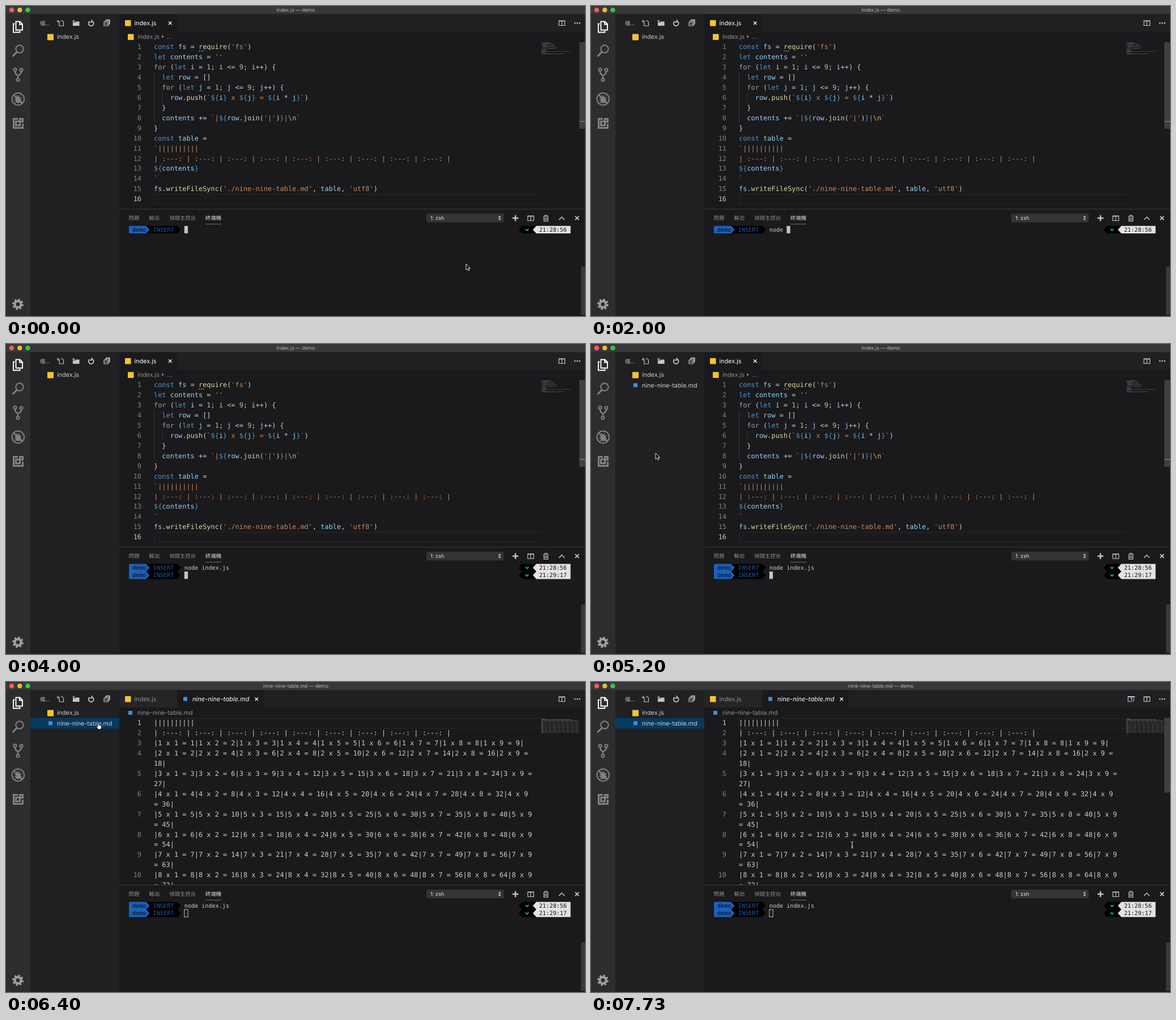
Animation of 1022x548 px, one loop 8000 ms. Source, as an HTML page:

```html
<!DOCTYPE html>
<html lang="zh-Hant">
<head>
<meta charset="utf-8">
<title>Nine-nine table</title>
<style>
  html, body { margin: 0; width: 100%; height: 100%; overflow: hidden; background: #1a191b; }
  svg { display: block; width: 1022px; height: 548px; }
  text { white-space: pre; text-rendering: geometricPrecision; font: 10.8px Inter, "Open Sans", sans-serif; fill: #cccbcd; }
  .title { font-size: 8.7px; text-anchor: middle; fill: #b9b8ba; }
  .code { font: 11.93px "DejaVu Sans Mono", monospace; fill: #cfced0; }
  .num { text-anchor: end; fill: #807f81; }
  .on { fill: #c6c5c7; }
  .term { font: 10.15px "DejaVu Sans Mono", monospace; }
  .cjk { font: 9.4px "Noto Sans CJK TC", "Noto Sans CJK", sans-serif; fill: #8f8e90; }
  .dim { fill: #918f92; }
  .tab { fill: #fff; }
  .italic { font-style: italic; font-size: 11.1px; }
  .line { fill: none; stroke: #c5c4c6; stroke-width: 1.2; }
  .act { fill: none; stroke: #828183; stroke-width: 2; }
</style>
</head>
<body>
<svg viewBox="0 0 1022 548" xmlns="http://www.w3.org/2000/svg">
  <defs><clipPath id="editorClip"><path d="M200 45H1022V358.5H200z"/></clipPath></defs>

  <!-- window areas -->
  <path fill="#1a191b" d="M0 0H1022V548H0z"/>
  <path fill="#383739" d="M0 0H1022V14.5H0z"/>
  <path fill="#2d2c2e" d="M0 14.5H43V548H0z"/>
  <path fill="#201f21" d="M43 14.5H200V548H43zM200 14.5H1022V45H200z"/>
  <circle cx="10" cy="7" r="4.3" fill="#fb5b54"/>
  <circle cx="24.3" cy="7" r="4.3" fill="#e6bd33"/>
  <circle cx="38.5" cy="7" r="4.3" fill="#35c648"/>

  <!-- activity bar -->
  <g class="act">
    <path stroke="#fff" stroke-width="1.9" d="M17.5 27.5h7l4.5 4.5v10.5H17.5zM24 28v4.5h5M15.5 31.5H13v15h11.5V44"/>
    <circle cx="24" cy="76" r="6.7"/><path stroke-width="3" d="M19 81.5L11.5 89"/>
    <circle cx="16" cy="112.5" r="2.6"/><circle cx="27" cy="113" r="2.6"/><circle cx="21" cy="130.5" r="2.6"/>
    <path stroke-width="2.4" d="M16 115.500q0 5 5 7.500v5M27 116q0 4.500-6 7"/>
    <circle cx="21.300" cy="164.500" r="10.800"/><path d="M13.700 157L29 172"/>
    <ellipse cx="21.300" cy="166" rx="3.500" ry="4.700" fill="#828183"/>
    <path stroke-width="1.400" d="M15 162l4 2M27.500 162l-4 2M14.500 167h13.500M15.500 172l4-3M27 172l-4-3M18.500 158l2 3M24 158l-2 3"/>
    <path stroke-width="3" d="M21 199.500H13.500V215.500H29.500V208M17.500 204h7v7h-7zM24.500 199.500h5v5h-5z"/>
    <circle cx="21" cy="527.300" r="5.500" stroke="#a09fa1" stroke-width="4"/>
    <circle cx="21" cy="527.300" r="8.500" stroke="#a09fa1" stroke-width="2.800" stroke-dasharray="3.600 3.076"/>
  </g>

  <!-- explorer -->
  <rect id="hover" x="43" width="157" height="18.500" fill="#272a2c"/>
  <rect id="selected" x="43" y="63.500" width="157" height="18.800" fill="#063a60"/>
  <text class="cjk" x="60" y="33.500" style="fill:#b5b4b6">檔...</text>
  <g class="line">
    <path d="M94 27.500v7.500h7.500v-6.500l-2-2.500h-3"/>
    <path d="M118.500 34.500v-5h4l1-1.500h5.500v6.500z" fill="#c5c4c6"/>
    <path stroke="#6fc27b" stroke-width="1.500" d="M89.500 27h5M92 24.500v5M117 27h5M119.500 24.500v5"/>
    <path stroke-width="1.700" d="M147.500 27a4.500 4.500 0 1 0 4-.700M151.500 24v4.500h-4"/>
    <path d="M173 28.500h7v6.500h-7zM174.500 36M175 28v-1.700h7V33h-2M177 26v-1.700h6V31h-1M174.500 31.800h4"/>
  </g>
  <path fill="#f3c332" d="M73 49.500h11v11H73z"/>
  <text x="90" y="58.300">index.js</text>
  <g id="newFile">
    <path fill="#3f8fd6" d="M75 69.300h7v7h-7z"/>
    <text x="90" y="76.700">nine-nine-table.md</text>
  </g>
  <path id="focus" fill="none" stroke="#0d4566" d="M43.500 45.500H199.500V547.500H43.500z"/>

  <!-- editor -->
  <g id="codeView">
    <text class="title" x="511.500" y="10.200">index.js — demo</text>
    <path fill="#1a191b" d="M200 14.500H302V45H200z"/>
    <path fill="#f3c332" d="M210 25h10.500v10.500H210zM215 49.500h10.500V60H215z"/>
    <text class="tab" x="226.500" y="34.200">index.js</text>
    <path class="line" stroke-width="1.700" style="stroke:#fff" d="M287 27.500l5.500 5.500m0-5.500l-5.500 5.500"/>
    <text class="dim" x="232" y="58.300">index.js</text>
    <path fill="#a3a2a4" d="M275.500 51.500v5l3.200-2.500z"/>
    <text class="dim" x="284" y="58.300">...</text>
    <path fill="none" stroke="#363537" d="M261.500 117.500V206M276 153.500V170.500"/>
    <path fill="none" stroke="#29282a" d="M945 333H261.500V350H945"/>
    <g id="codeLines"></g>
    <path fill="#bbb" d="M340.500 78.700h1.500v1.500h-1.500zm3.500 0h1.500v1.500h-1.500zm3.500 0h1.500v1.500h-1.500z"/>
    <path fill="#3f3e40" d="M1012 64H1022V217H1012z"/>
    <path fill="#777678" d="M1012 203.300H1022V205H1012z"/>
  </g>
  <g id="tableView">
    <text class="title" x="511.500" y="10.200">nine-nine-table.md — demo</text>
    <path fill="#252426" d="M200 14.500H302V45H200z"/>
    <path fill="#1a191b" d="M302 14.500H454V45H302z"/>
    <path fill="#f3c332" d="M210 25h10.500v10.500H210z"/>
    <path fill="#3f8fd6" d="M313 26.500h7v7h-7zM216 51h7v7h-7z"/>
    <text class="dim" x="226.500" y="34.200">index.js</text>
    <text class="tab italic" x="329" y="34.200">nine-nine-table.md</text>
    <path class="line" stroke-width="1.700" style="stroke:#fff" d="M439.500 27.500l5.500 5.500m0-5.500l-5.500 5.500"/>
    <text class="dim" x="232" y="58.300">nine-nine-table.md</text>
    <path fill="none" stroke="#29282a" d="M945 64.500H261.500V81.500H945"/>
    <g id="tableLines" clip-path="url(#editorClip)"></g>
  </g>
  <g id="late">
    <path fill="#3f3e40" d="M1012 63.500H1022V195.500H1012z"/>
    <path class="line" d="M952 34.500h-4v-9h11v3M953.500 25.500v5M948 26.500h11"/>
    <circle class="line" cx="956" cy="31.500" r="2.300" style="stroke:#62a5d8"/>
    <path class="line" style="stroke:#62a5d8" d="M954.500 33.500l-2 2.500"/>
  </g>
  <path class="line" d="M976 26h10.500v8.500H976zM981.200 26v8.500M976 26.700h10.500"/>
  <path fill="#c5c4c6" d="M1003 29h2.300v2.300H1003zm4.200 0h2.300v2.300h-2.300zm4.200 0h2.300v2.300h-2.300z"/>

  <!-- panel -->
  <path fill="#3b3a3c" d="M200 358.500H1022V359.500H200z"/>
  <text class="cjk" x="216.500" y="378.200">問題</text>
  <text class="cjk" x="252.500" y="378.200">輸出</text>
  <text class="cjk" x="288.300" y="378.200">偵錯主控台</text>
  <text class="cjk" x="352" y="378.200" style="fill:#e4e3e5">終端機</text>
  <path fill="#6f6e70" d="M352 385H380V386H352z"/>
  <rect x="742" y="367" width="136.500" height="15.500" rx="2" fill="#343335"/>
  <text x="749" y="378" style="font-size:9.300px;fill:#e2e1e3">1: zsh</text>
  <path fill="#d5d4d6" d="M868.800 373.700h5l-2.500-3zM868.800 375.700h5l-2.500 3z"/>
  <g class="line">
    <path stroke-width="2.400" d="M894 375h10.500M899.200 369.700v10.500"/>
    <path d="M921 371h10.500v8.500H921zM926.200 371v8.500M921 371.700h10.500"/>
    <path d="M949.500 373v7.500h7V373M948 372h10M951 371.500v-1.500h4v1.500M951.700 374v5M954.300 374v5"/>
    <path stroke-width="1.500" d="M976 378l5-5 5 5"/>
    <path stroke-width="1.900" d="M1004.700 371.700l6.500 6.500m0-6.500l-6.500 6.500"/>
  </g>
  <path fill="#39383a" d="M1015 460.500H1022V546H1015z"/>
  <g id="prompt1"></g>
  <g id="prompt2"></g>
  <text id="typed" class="term" x="314.800" y="399"></text>
  <rect id="caret" width="6.300" height="13"/>

  <g id="mouse">
    <path id="arrow" fill="#000" stroke="#fff" stroke-width=".9" d="M0 0V10.500L2.500 8.300 4.200 12 6 11.200 4.400 7.600H7.500z"/>
    <path id="hand" fill="#fff" stroke="#000" stroke-width=".7" d="M-1 1q1-1.500 2 0v3.500q1-.800 1.500.300 1-.600 1.500.500 1.200-.400 1.300 1v2.500L4.300 11.500H-.500L-3.300 7q0-1.500 1.500-.700l.800.900z"/>
    <path id="beam" fill="none" stroke="#e0dfe1" d="M-2.200-5.500q2.200 0 2.200 1.500v8q0 1.500-2.200 1.500M2.200-5.500Q0-5.500 0-4M0 4q0 1.500 2.200 1.500M-1.300 2h2.600"/>
  </g>
</svg>
<script>
const el = id => document.getElementById(id);
const show = (id, on) => el(id).style.display = on ? '' : 'none';
const esc = s => s.replace(/&/g, '&amp;').replace(/</g, '&lt;');

// Code: segments split by "¦", first character of each is its colour key
const COLORS = { k: '#4f94cd', v: '#96d3f5', f: '#d7d7a5', s: '#c5895f', n: '#aec6a1', p: '#cfced0', c: '#a09fa1', e: '#d0b476' };
const HEADER = '| :---: '.repeat(9) + '|';
const PIPES = '|'.repeat(10);
const loop = v => `cfor ¦p(¦klet ¦v${v} ¦p= ¦n1¦p; ¦v${v} ¦p<= ¦n9¦p; ¦v${v}¦p++) {`;
const CODE = [
  "kconst ¦vfs ¦p= ¦frequire¦p(¦s'fs'¦p)",
  "klet ¦vcontents ¦p= ¦s''",
  loop('i'),
  "p  ¦klet ¦vrow ¦p= []",
  'p  ¦' + loop('j'),
  "p    ¦vrow¦p.¦fpush¦p(¦s`¦k${¦vi¦k}¦s x ¦k${¦vj¦k}¦s = ¦k${¦vi ¦p* ¦vj¦k}¦s`¦p)",
  "p  }",
  "p  ¦vcontents ¦p+= ¦s`|¦k${¦vrow¦p.¦fjoin¦p(¦s'|'¦p)¦k}¦s|¦e\\n¦s`",
  "p}",
  "kconst ¦vtable ¦p=",
  's`' + PIPES,
  's' + HEADER,
  "k${¦vcontents¦k}",
  "s`",
  "vfs¦p.¦fwriteFileSync¦p(¦s'./nine-nine-table.md'¦p, ¦vtable¦p, ¦s'utf8'¦p)",
  "p"
].map((line, i) => ({ num: i + 1, segs: line.split('¦').map(s => [COLORS[s[0]], s.slice(1)]) }));

// Table: lines wrap at the last space that fits
const WRAP = 93;
const nine = [1, 2, 3, 4, 5, 6, 7, 8, 9];
const TABLE = [PIPES, HEADER, ...nine.map(i => '|' + nine.map(j => `${i} x ${j} = ${i * j}|`).join(''))]
  .flatMap((line, i) => {
    const cut = line.length > WRAP ? line.lastIndexOf(' ', WRAP) : line.length;
    const rows = [{ num: i + 1, segs: [[COLORS.p, line.slice(0, cut)]] }];
    if (cut < line.length) rows.push({ segs: [[COLORS.p, line.slice(cut + 1)]] });
    return rows;
  });

function drawLines(id, rows, active) {
  let out = '';
  rows.forEach(({ num, segs }, i) => {
    const y = 76.3 + i * 17.93;
    if (num) out += `<text class="code num ${num === active ? 'on' : ''}" x="239" y="${y}">${num}</text>`;
    out += `<text class="code" x="261" y="${y}">` +
      segs.map(([color, s]) => `<tspan style="fill:${color}">${esc(s)}</tspan>`).join('') + '</text>';
    let col = 0;
    for (const [color, s] of segs) {
      for (const word of s.matchAll(/\S+/g)) {
        out += `<rect x="${945 + (col + word.index) * 0.72}" y="${64.5 + i * 1.4}" width="${word[0].length * 0.72}" height=".9" fill="${color}" opacity=".45"/>`;
      }
      col += s.length;
    }
  });
  el(id).innerHTML = out;
}
drawLines('codeLines', CODE, 16);
drawLines('tableLines', TABLE, 1);

function drawPrompt(id, y, time) {
  el(id).innerHTML = `<g transform="translate(0 ${y})">
    <path fill="#000" d="M247 0H302.500L308.500 6.700 302.500 13.400H247zM936 0H911L905 6.700 911 13.400H936z"/>
    <path fill="#1c60b8" d="M217 0H247.300L253.500 6.700 247.300 13.400H217z"/>
    <path fill="#e3e2e4" d="M996.500 0H936L930 6.700 936 13.400H996.500z"/>
    <path fill="none" stroke="#17bd69" stroke-width="1.800" d="M917 5.500l2.700 2.700 2.700-2.700"/>
    <text class="term" x="223" y="10.300" style="fill:#0b0b0c">demo</text>
    <text class="term" x="259.800" y="10.300" style="fill:#1f5ca8">INSERT</text>
    <text class="term" x="941" y="10.300" style="fill:#141315">${time}</text></g>`;
}
drawPrompt('prompt1', 388.7, '21:28:56');
drawPrompt('prompt2', 402, '21:29:17');

// All times below are in ticks of 1/15 s
const LOOP = 8000, TICK = 1000 / 15;
const COMMAND = 'node index.js';
const KEYS = [17, 19, 21, 23, 25, 32, 34, 36, 37, 39, 41, 42, 44];
const AT = { run: 47, file: 66, mouseBack: 67, focus: 94, open: 96, late: 98 };
const PATH = [[0, 812, 456], [67, 812, 456], [69, 809, 462], [77, 114, 193], [81, 114, 193], [89, 163, 72], [104, 163, 72], [113, 461, 288], [120, 461, 288]];

function mouseAt(tick) {
  const i = PATH.findIndex((p, n) => n && tick <= p[0]);
  const [t0, x0, y0] = PATH[i - 1], [t1, x1, y1] = PATH[i];
  const k = (tick - t0) / (t1 - t0), e = k * k * (3 - 2 * k);
  return [x0 + (x1 - x0) * e, y0 + (y1 - y0) * e];
}

function render(ms) {
  const tick = Math.min(116, Math.floor((ms % LOOP + 4) / TICK));
  const opened = tick >= AT.open, ran = tick >= AT.run, hasFile = tick >= AT.file;

  show('codeView', !opened);
  show('tableView', opened);
  show('selected', opened);
  show('late', tick >= AT.late);
  show('newFile', hasFile);
  show('focus', tick >= AT.focus && !opened);
  show('prompt2', ran);

  const count = KEYS.filter(k => k <= tick).length;
  el('typed').textContent = COMMAND.slice(0, count);
  const caret = el('caret'), hollow = tick >= AT.focus;
  caret.setAttribute('x', 314.8 + (ran ? 0 : count * 6.11));
  caret.setAttribute('y', ran ? 402.2 : 388.8);
  caret.setAttribute('fill', hollow ? 'none' : '#c4c3c5');
  caret.setAttribute('stroke', hollow ? '#c4c3c5' : 'none');

  const [x, y] = mouseAt(tick);
  const visible = tick < KEYS[0] || tick >= AT.mouseBack;
  const row = x > 43 && x < 200 && y >= 45 ? Math.floor((y - 45) / 18.5) : -1;
  const onRow = visible && row >= 0 && row < (hasFile ? 2 : 1);
  const inEditor = x >= 200 && y > 63 && y < 358;
  show('mouse', visible);
  el('mouse').setAttribute('transform', `translate(${x} ${y})`);
  show('hand', onRow);
  show('beam', inEditor);
  show('arrow', !onRow && !inEditor);
  show('hover', onRow);
  el('hover').setAttribute('y', 45 + row * 18.5);
}

function play() {
  render(performance.now());
  requestAnimationFrame(play);
}
play();
</script>
</body>
</html>
```
